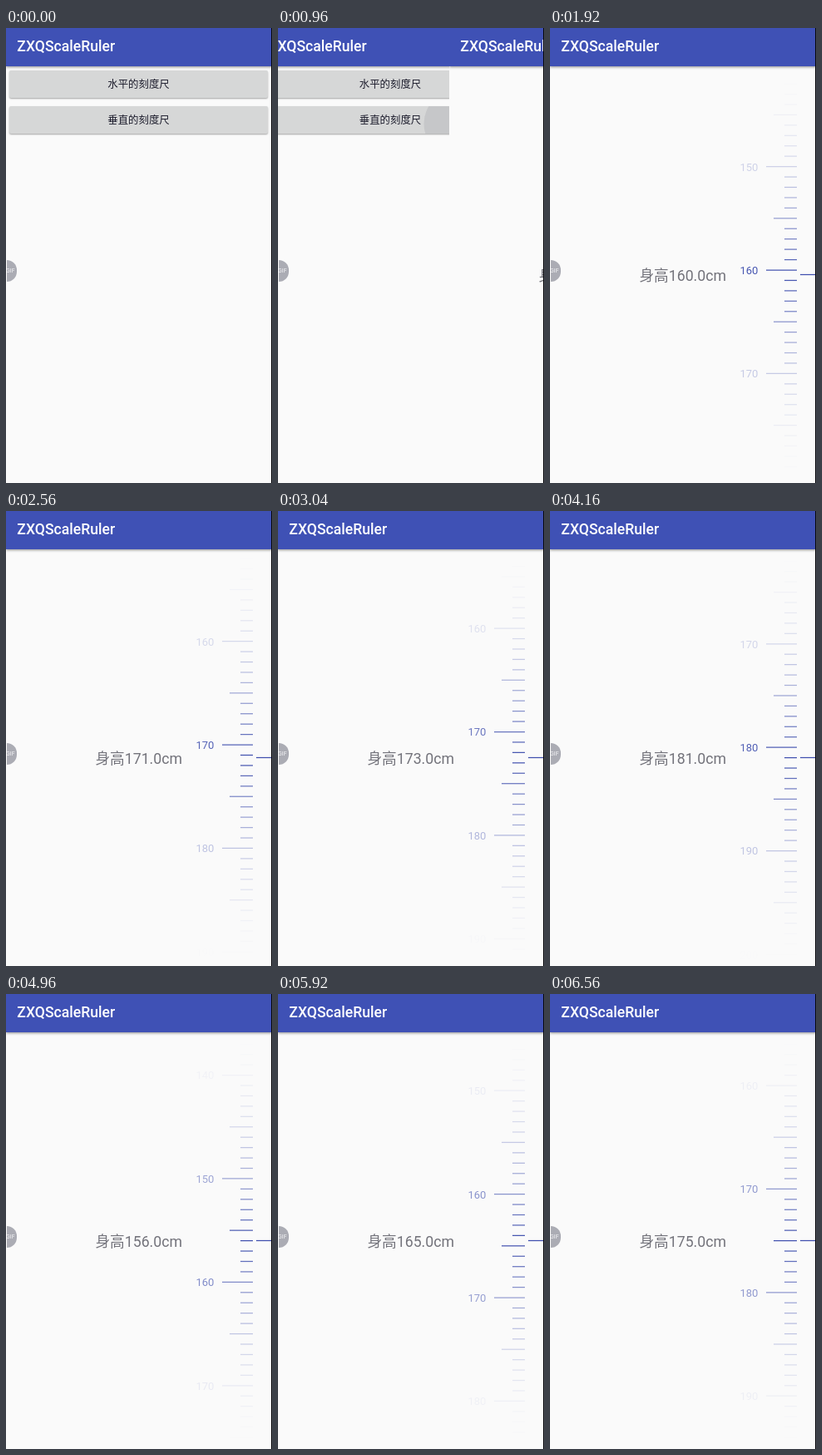
These frames come from a looping animation (320 by 547 pixels, 7040 ms). An HTML page:

```html
<!DOCTYPE html>
<html lang="zh-CN">
<head>
<meta charset="utf-8">
<title>ZXQScaleRuler</title>
<style>
  html, body { margin: 0; width: 100%; height: 100%; overflow: hidden; background: #fafafa; }
  #stage {
    position: relative; width: 320px; height: 547px; overflow: hidden;
    font-family: Roboto, "Noto Sans CJK SC", "Noto Sans CJK", sans-serif;
  }
  .page { position: absolute; inset: 0; overflow: hidden; background: #fafafa; }
  .bar {
    position: absolute; left: 0; top: 0; width: 100%; height: 46px; box-sizing: border-box;
    padding-left: 13.3px; background: #3f51b5; color: #fff;
    font-size: 17.6px; font-weight: 500; line-height: 45px; white-space: nowrap;
    box-shadow: 0 1px 3px rgba(0, 0, 0, .45);
  }
  .button {
    position: absolute; left: 4px; width: 311px; height: 33px; border-radius: 2px;
    background: #d6d7d7; color: #1c1c2c; font-size: 12.4px; line-height: 33px; text-align: center;
    box-shadow: 0 1px 2px rgba(0, 0, 0, .35);
  }
  .clip { position: absolute; inset: 0; overflow: hidden; border-radius: 2px; }
  #ripple { position: absolute; left: 236px; top: 21px; border-radius: 50%; background: rgba(40, 40, 60, .09); }
  .label { position: relative; }
  svg { position: absolute; left: 0; top: 0; }
  #value { font-size: 17.7px; fill: #73737b; text-anchor: middle; }
  #ruler text { font-size: 13px; text-anchor: middle; fill: #3f4fae; }
  #ruler line, #pointer { stroke: #3f4fae; stroke-width: 1.25; }
  #badge {
    position: absolute; left: 1px; top: 279px; width: 12px; height: 26px; overflow: hidden;
    border-radius: 0 13px 13px 0; background: #abacb4; color: #f4f4f6;
    font-size: 7px; line-height: 27px; text-indent: -1px;
  }
  #edge { position: absolute; right: 0; top: 0; width: 1px; height: 100%; background: #08080c; }
</style>
</head>
<body>
<div id="stage">
  <div class="page" id="menu">
    <div class="bar">ZXQScaleRuler</div>
    <div class="button" style="top:51px">水平的刻度尺</div>
    <div class="button" style="top:94px">
      <div class="clip"><div id="ripple"></div></div><span class="label">垂直的刻度尺</span>
    </div>
  </div>
  <div class="page" id="detail">
    <svg width="320" height="547">
      <text id="value" x="159.7" y="303.8"></text>
      <g id="ruler"></g>
      <line id="pointer" x1="301" x2="320" y1="296.5" y2="296.5"/>
    </svg>
    <div class="bar">ZXQScaleRuler</div>
  </div>
  <div id="badge">GIF</div>
  <div id="edge"></div>
</div>
<script>
  const LOOP = 7040, STEP = 160;
  const CENTER = 296.6, GAP = 12.44, FADE = 250;
  const $ = id => document.getElementById(id);

  // Each drag: start time and the ruler position after every step.
  const drags = [
    [1920, [160.45, 162.7, 166.2, 169.4, 171.25, 171.9, 172]],
    [3040, [172.5, 174.7, 177.6, 179.9, 181.2, 181.8, 182]],
    [4160, [181, 176.2, 168.4, 161.3, 157.2, 156]],
    [5600, [156.5, 159.5, 164.5, 169.6, 173.1, 174.6, 175]]
  ];
  const slide = [320, 206, 28, 0];
  const rippleSize = [18, 40, 60, 60];

  function svgEl(name, attrs, parent) {
    const el = document.createElementNS("http://www.w3.org/2000/svg", name);
    for (const key in attrs) el.setAttribute(key, attrs[key]);
    return parent.appendChild(el);
  }

  const ticks = [];
  for (let n = 135; n <= 205; n++) {
    const g = svgEl("g", {}, $("ruler"));
    const x1 = n % 10 === 0 ? 260 : n % 5 === 0 ? 269 : 282;
    svgEl("line", { x1, x2: 297, y1: 0, y2: 0 }, g);
    if (n % 10 === 0) svgEl("text", { x: 239.4, y: 4.9 }, g).textContent = n;
    ticks.push({ n, g });
  }

  function stepValue(list, start, t) {
    const i = Math.floor((t - start) / STEP);
    return list[Math.min(i, list.length - 1)];
  }

  function rulerAt(t) {
    let pos = 160;
    for (const [start, list] of drags) if (t >= start) pos = stepValue(list, start, t);
    return pos;
  }

  function drawRuler(pos) {
    for (const { n, g } of ticks) {
      const dy = (n - pos) * GAP;
      const near = Math.max(0, 1 - Math.abs(dy) / FADE);
      g.setAttribute("transform", `translate(0 ${(CENTER + dy).toFixed(2)})`);
      g.setAttribute("opacity", (near * near).toFixed(3));
    }
    $("value").textContent = `身高${Math.round(pos).toFixed(1)}cm`;
  }

  function draw(t) {
    const x = t < 800 ? 320 : stepValue(slide, 800, t);
    const r = t < 800 ? 0 : stepValue(rippleSize, 800, t);
    $("detail").style.transform = `translateX(${x}px)`;
    $("menu").style.transform = `translateX(${(x - 320) * 0.215}px)`;
    $("ripple").style.width = $("ripple").style.height = `${2 * r}px`;
    $("ripple").style.margin = `${-r}px 0 0 ${-r}px`;
    drawRuler(rulerAt(t));
  }

  const begin = performance.now();
  function frame() {
    draw((performance.now() - begin) % LOOP);
    requestAnimationFrame(frame);
  }
  draw(0);
  requestAnimationFrame(frame);
</script>
</body>
</html>
```
